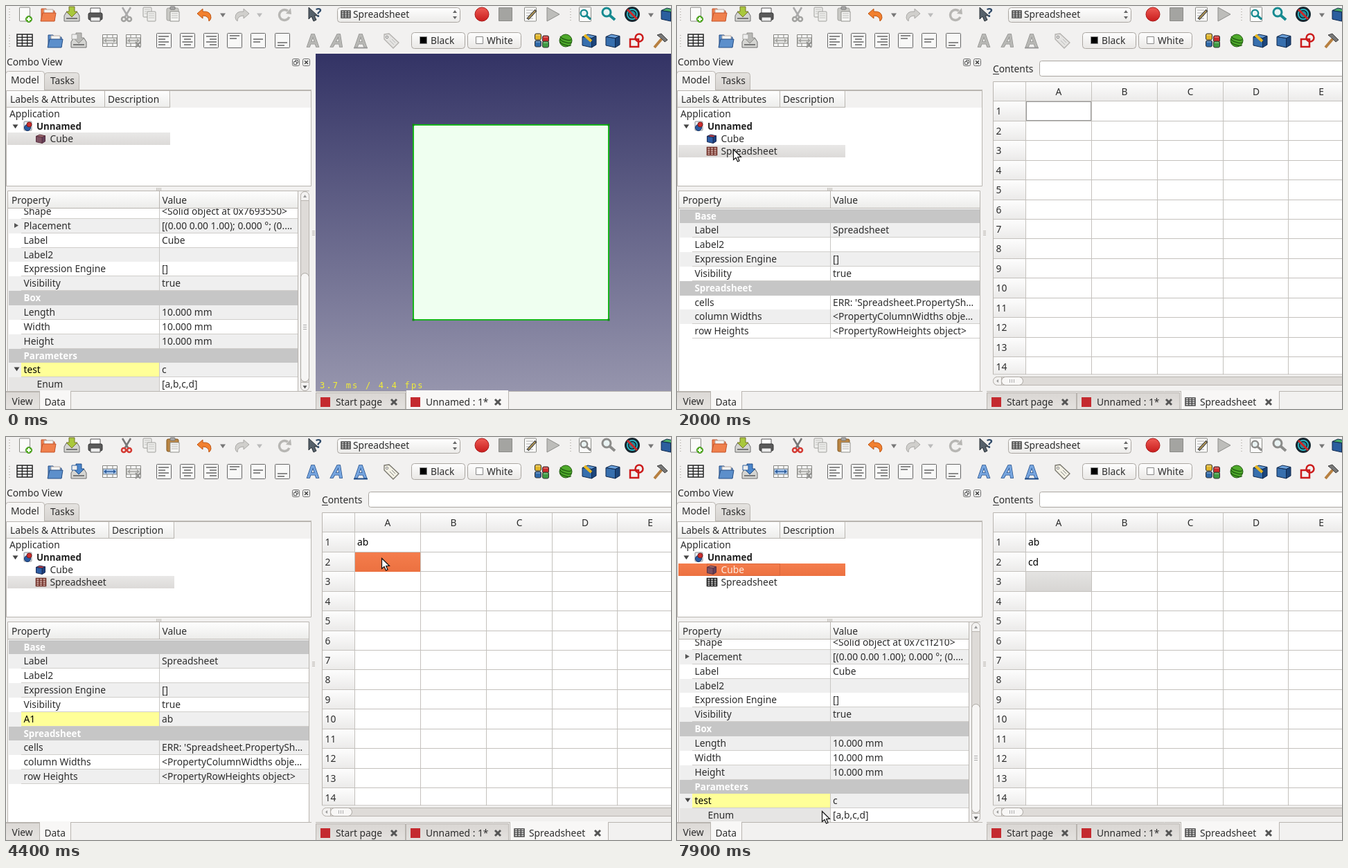
Animation of 960x583 px, one loop 8 s. Source, as an HTML page with a canvas:

```html
<!DOCTYPE html>
<html lang="en">
<head>
<meta charset="utf-8">
<title>Spreadsheet demo</title>
<style>
html, body { margin: 0; width: 100%; height: 100%; overflow: hidden; background: #f2f1f0; }
canvas { display: block; }
</style>
</head>
<body>
<canvas id="stage" width="960" height="583"></canvas>
<script>
const c = document.getElementById('stage').getContext('2d');
const LOOP = 8000, STEP = 100;
const UI = '13.8px "Noto Sans", "Open Sans", sans-serif';
const BOLD = 'bold 13.3px "Noto Sans", "Open Sans", sans-serif';
const INK = '#2c2c2c', LINE = '#b9b5b0', BG = '#f2f1f0', ORANGE = '#f07746';

// --- drawing helpers ---
function paint(fill, stroke, w = 1) {
  if (fill) { c.fillStyle = fill; c.fill(); }
  if (stroke) { c.strokeStyle = stroke; c.lineWidth = w; c.stroke(); }
}
function rect(x, y, w, h, fill, stroke, r = 0, lw = 1) {
  c.beginPath(); c.roundRect(x, y, w, h, r); paint(fill, stroke, lw);
}
function circle(x, y, r, fill, stroke, w) {
  c.beginPath(); c.arc(x, y, r, 0, 7); paint(fill, stroke, w);
}
function poly(p, fill, stroke, w, open) {
  c.beginPath();
  for (let i = 0; i < p.length; i += 2) c.lineTo(p[i], p[i + 1]);
  if (!open) c.closePath();
  paint(fill, stroke, w);
}
const line = (x1, y1, x2, y2, col = LINE, w = 1) => poly([x1, y1, x2, y2], null, col, w, true);
function text(s, x, y, col = INK, font = UI, align = 'left') {
  c.font = font; c.fillStyle = col; c.textAlign = align;
  c.fillText(s, x, y);
}
function fade(y0, y1, a, b) {
  const g = c.createLinearGradient(0, y0, 0, y1);
  g.addColorStop(0, a); g.addColorStop(1, b);
  return g;
}
function at(x, y, draw) { c.save(); c.translate(x, y); draw(); c.restore(); }
const down = (x, y, r, col) => poly([x - r, y - r * .6, x + r, y - r * .6, x, y + r * .8], col);

// --- icons, centred on 0,0 ---
function grid(x, y, w, h, rows, col, bg = '#fff') {
  rect(x, y, w, h, bg, col, 0, 1.5);
  for (let i = 1; i < rows; i++) line(x, y + h * i / rows, x + w, y + h * i / rows, col, 1.4);
  for (let i = 1; i < 3; i++) line(x + w * i / 3, y, x + w * i / 3, y + h, col, 1.4);
}
function box(s, face, side, top, edge = '#10294e') {
  poly([-s, -s * .55, s * .35, -s * .35, s * .35, s, -s, s * .7], face, edge);
  poly([s * .35, -s * .35, s, -s * .65, s, s * .6, s * .35, s], side, edge);
  poly([-s, -s * .55, -s * .2, -s * .9, s, -s * .65, s * .35, -s * .35], top, edge);
}
function page(w = 15, h = 20) { rect(-w / 2, -h / 2, w, h, '#fbfbfa', '#8b8b87', 1); }
function folder(col, edge) {
  poly([-10, 9, -10, -8, -3, -8, -1, -5, 9, -5, 9, 9], col, edge);
  rect(-6, -7, 13, 7, '#f4f4f2', '#b5aaa4');
  poly([-11, 10, -8, -2, 11, -2, 9, 10], col, edge);
}
function drive(arrow, body, edge) {
  poly([-11, 2, -8, -3, 8, -3, 11, 2, 11, 10, -11, 10], body, '#6c6c6c');
  line(-8, 6, 8, 6, '#777', 2);
  poly([-4, -11, 4, -11, 4, -4, 8, -4, 0, 4, -8, -4, -4, -4], arrow, edge);
}
function lens(col) {
  line(2, 2, 10, 9, col, 4);
  circle(-2, -2, 6, '#e9f3f3', col, 3);
}
function bend(col, edge) {
  c.beginPath();
  c.moveTo(-11, -2); c.lineTo(-3, -9); c.lineTo(-3, -5);
  c.quadraticCurveTo(9, -6, 9, 4); c.quadraticCurveTo(8, 8, 6, 9);
  c.quadraticCurveTo(6, 1, -3, 1); c.lineTo(-3, 5); c.closePath();
  paint(col, edge);
}
function align(x, kind) {
  rect(x - 10.5, 39.5, 21, 21, '#f8f8f7', '#666', 1);
  for (let i = 0; i < 4; i++) {
    const w = i % 2 ? 10 : 15, sx = [x - 8, x - w / 2, x + 8 - w][kind];
    if (kind < 3) line(sx, 44 + i * 4, sx + w, 44 + i * 4, '#666', 1.5);
  }
  if (kind > 2) [0, 4].forEach(d => line(x - 7, 43 + (kind - 3) * 5 + d, x + 7 - d, 43 + (kind - 3) * 5 + d, '#666', 1.5));
}
function merge(x, on, split) {
  const col = on ? '#2f5f9e' : '#a3a3a0';
  rect(x - 10.5, 41.5, 21, 17, '#fafafa', '#868682');
  [-4, 4].forEach(d => { line(x + d, 42, x + d, 46, '#868682'); line(x + d, 54, x + d, 58, '#868682'); });
  rect(x - 10, 46, 20, 8, on ? '#a9c6ea' : '#e6e6e4', '#868682');
  line(x - 8, 50, x + 8, 50, col, 1.5);
  poly([x - 9, 50, x - 5, 47, x - 5, 53], col);
  poly([x + 9, 50, x + 5, 47, x + 5, 53], col);
  if (split) { line(x + 3, 52, x + 10, 60, '#929290', 2); line(x + 10, 52, x + 3, 60, '#929290', 2); }
}
function letter(x, on, style) {
  c.font = style + 'bold 25px "Liberation Sans", sans-serif';
  c.textAlign = 'center';
  c.lineWidth = 1.4; c.strokeStyle = on ? '#1d4a87' : '#8d8d8b';
  c.strokeText('A', x, 59);
  c.fillStyle = on ? '#76a5df' : '#b8b8b5';
  c.fillText('A', x, 59);
}
function handle(x, y) {
  for (let i = -2; i < 3; i++) rect(x, y + i * 4, 2, 1, '#c4c0bb');
}

// --- toolbars ---
function topBar(s) {
  handle(4, 12);
  at(27, 12, () => { page(); circle(6, 7, 4.5, '#5fb92d', '#3c8a16'); line(3, 7, 9, 7, '#fff', 2); line(6, 4, 6, 10, '#fff', 2); });
  at(61, 12, () => folder('#f0804c', '#c4532a'));
  at(95, 12, () => drive('#a9c83c', '#d3d3d0', '#75752c'));
  at(129, 12, () => {
    rect(-7, -9, 14, 9, '#fff', '#555');
    rect(-10, -2, 20, 10, '#5b5b5b', '#333', 2);
    rect(-7, 4, 14, 6, '#eee', '#444');
  });
  at(174, 12, () => {
    const col = s.tools ? '#d43a33' : '#a2a2a0', blade = s.tools ? '#777' : '#aaa';
    line(-6, -10, 3, 5, blade, 2.5); line(6, -10, -3, 5, blade, 2.5);
    circle(-4, 7, 3, null, col, 2.5); circle(4, 7, 3, null, col, 2.5);
  });
  at(207, 12, () => [[-9, -10], [-3, -4]].forEach(([x, y]) => {
    rect(x, y, 12, 14, '#eeeeec', '#a0a09c', 1);
    for (let i = 3; i < 12; i += 3) line(x + 2, y + i, x + 10, y + i, '#c2c2bf');
  }));
  at(241, 12, () => {
    rect(-9, -9, 17, 18, s.tools ? '#b98543' : '#c9c9c5', s.tools ? '#80561f' : '#a0a09c', 2);
    rect(-4, -11, 7, 4, '#aaa', '#777', 1);
    rect(-4, -4, 13, 14, '#f6f6f4', '#90908c');
    for (let i = -1; i < 8; i += 3) line(-2, i, 7, i, '#b7b7b4');
  });
  at(287, 13, () => bend('#f2802f', '#bd5616'));
  down(313, 13, 4, '#777');
  at(340, 13, () => { c.scale(-1, 1); bend('#d0cfcc', '#aaa9a6'); });
  down(366, 13, 4, '#bbb');
  c.beginPath(); c.arc(402, 13, 7.5, .4, 5.4); paint(null, '#b7b6b3', 3.5);
  poly([404, 11, 411, 3, 412, 12], '#b7b6b3');
  poly([437, 2, 437, 19, 441, 15, 444, 22, 448, 20, 445, 14, 450, 14], '#56616b', '#2a3036');
  text('?', 447, 16, '#2f4a68', 'bold 18px "Noto Sans", sans-serif');

  rect(478.5, 2.5, 177, 21, fade(2, 24, '#fff', '#ebeae8'), '#aaa6a1', 4);
  grid(484, 7, 13, 10, 4, '#444');
  text('Spreadsheet', 501, 17);
  poly([645, 10, 651, 10, 648, 6], '#666'); poly([645, 15, 651, 15, 648, 19], '#666');

  circle(687, 12, 10, fade(2, 22, '#ee5a53', '#c91d1d'), '#a91818');
  rect(711.5, 2.5, 19, 19, '#a4a4a1', '#8b8b88');
  at(757, 12, () => {
    page(17, 20);
    for (let i = -6; i < 8; i += 4) line(-6, i, 4, i, '#aaa');
    line(-4, 7, 8, -6, '#444', 4); line(-3, 6, 7, -5, '#c9a95a', 1.5);
  });
  poly([781, 2, 799, 12, 781, 22], '#bdbdba', '#8f8f8c');
  handle(814, 12);
  const zoom = s.tools ? '#8c8c8a' : '#168a90';
  at(836, 12, () => { page(17, 21); c.scale(.8, .8); lens(zoom); });
  at(869, 11, () => lens(zoom));
  circle(904, 12, 9.5, '#2ec0ce', '#17262f', 3);
  circle(904, 12, 5.5, '#1d8f9f', '#17262f', 1.5);
  line(897, 5, 911, 19, '#cf2828', 3);
  down(931, 13, 4, '#777');
  at(956, 12, () => box(10, '#2b5e9e', '#1b3d72', '#4caf6a'));
}

function sheetBar(s) {
  handle(4, 50);
  if (s.hover) rect(11.5, 34.5, 31, 31, fade(34, 66, '#fff', '#e9e7e4'), '#b9b5b0', 4);
  grid(16, 41, 22, 17, 4, '#222');
  at(71, 50, () => folder('#5c8fcb', '#274f86'));
  at(105, 50, () => {
    drive(s.tools ? '#4a86cc' : '#b9b9b6', '#d5d5d2', s.tools ? '#234f87' : '#8f8f8c');
    rect(-10, -9, 8, 7, '#eee', s.tools ? '#2d5e9c' : '#a8a8a5');
  });
  merge(150, s.tools); merge(184, false, true);
  [228, 262, 296, 330, 364, 399].forEach(align);
  letter(443, s.tools, ''); letter(478, s.tools, 'italic '); letter(512, s.tools, '');
  line(502, 60.5, 522, 60.5, s.tools ? '#1d4a87' : '#999', 2);
  poly([546, 41, 553, 40, 567, 53, 559, 61, 546, 48], s.tag ? '#f2f0e4' : '#e4e3e1', s.tag ? '#77756c' : '#b3b1ae', 1.3);
  circle(550, 45, 1.7, BG, '#888');
  line(554, 50, 560, 56, s.tag ? '#888' : '#bbb'); line(557, 48, 562, 53, s.tag ? '#888' : '#bbb');
  [[585, 'Black', '#000'], [666, 'White', '#fff']].forEach(([x, name, col]) => {
    rect(x + .5, 38.5, 77, 23, fade(38, 62, '#fefefe', '#e9e7e5'), '#aaa6a1', 4);
    rect(x + 12.5, 44.5, 10, 10, col, '#888');
    text(name, x + 28, 55);
  });
  at(774, 50, () => {
    [['#e0b52b', -6, -6], ['#cc2b2b', 5, -3], ['#2e68a8', -6, 4], ['#3f9b43', 5, 5]].forEach(([col, x, y]) => {
      rect(x - 4.5, y - 4, 9, 9, col, '#333', 2);
      line(x - 3, y - 2, x + 3, y - 2, '#fff8');
    });
  });
  circle(808, 50, 9, '#4faa2b', '#20590e');
  for (let i = -1; i < 2; i++) {
    c.beginPath(); c.ellipse(808, 50 + i * 4, 8, 2.5, .3, 0, 3.1); paint(null, '#1f5b10', 1.3);
  }
  at(842, 50, () => { box(10, '#376fae', '#1c467c', '#5d94cf'); line(-7, -8, 3, 1, '#e9b822', 4); });
  at(876, 50, () => box(10, '#376fae', '#1c467c', '#6aa0da'));
  rect(901, 48, 12, 11, null, '#cc1b1b', 0, 2.5);
  circle(914, 46, 5.5, null, '#cc1b1b', 2.5);
  line(936, 60, 947, 47, '#b78041', 4);
  poly([940, 42, 946, 40, 955, 49, 951, 52, 945, 46], '#777', '#444');
}

// --- left dock ---
function cubeIcon(x, y, sel) {
  at(x, y, () => sel ? box(6.5, '#7c5061', '#63405a', '#a26b6c', '#5a3041') : box(6.5, '#2d5da5', '#1d3f80', '#c8383c', '#1c2c55'));
}
function dock(s) {
  text('Combo View', 1, 86);
  [418, 433].forEach((x, i) => {
    rect(x - 4.5, 76.5, 10, 10, '#f8f8f7', '#666', 2);
    if (i) { line(x - 2, 79, x + 3, 84, '#444', 1.6); line(x + 3, 79, x - 2, 84, '#444', 1.6); }
    else { rect(x - .5, 78.5, 4, 4, null, '#555'); rect(x - 2.5, 80.5, 4, 4, '#fff', '#555'); }
  });
  rect(55.5, 96.5, 50, 26, fade(96, 122, '#e5e3e0', '#d6d3d0'), LINE, [4, 4, 0, 0]);
  line(0, 121.5, 441, 121.5);
  rect(-.5, 94.5, 56, 28, '#f6f5f4', LINE, [4, 4, 0, 0]);
  rect(0, 121, 55, 3, '#f6f5f4');
  text('Model', 7, 112); text('Tasks', 64, 113);

  const split = s.made ? 148 : 142, end = split + 95;
  rect(.5, 122.5, 440, 138, '#fff', LINE);
  rect(1, 123, 439, 24, BG);
  rect(1, 123, end, 24, fade(123, 147, '#fefefe', '#ececea'));
  line(1, 146.5, end, 146.5); line(split + .5, 123, split + .5, 147); line(end - .5, 123, end - .5, 147);
  text('Labels & Attributes', 6, 140); text('Description', split + 5, 140);
  text('Application', 5, 161);
  down(13.5, 174, 4, '#444');
  rect(26, 167, 11, 13, '#e9edf2', '#8a8f96', 1);
  circle(31, 176, 4.5, '#2a5aa0', '#173666'); circle(33.5, 171.5, 3.5, '#cc2f2f', '#7c1717');
  text('Unnamed', 44, 179, '#222', BOLD);

  const selY = s.sheetSel ? 201 : 183;
  rect(2, selY, end - 2, 18, s.hot ? fade(selY, selY + 18, '#f47d4d', '#ec7140') : fade(selY, selY + 18, '#e9e8e7', '#dcdad8'));
  if (s.hot) rect(43.5, selY + .5, split - 43, 17, null, '#d9663a');
  const tone = sel => sel && s.hot ? '#fdeadd' : INK;
  cubeIcon(50, 192, !s.sheetSel);
  text('Cube', 63.5, 197, tone(!s.sheetSel));
  if (s.made) {
    grid(43.5, 204.5, 14, 11, 4, s.sheetSel ? '#6b2820' : '#111', s.sheetSel ? '#f3dcd4' : '#fff');
    text('Spreadsheet', 63.5, 215, tone(s.sheetSel));
  }
  for (let i = 0; i < 4; i++) {
    rect(217 + i * 2, 263, 1, 4, '#c0bcb7');
    rect(442, 325 + i * 2, 4, 1, '#c0bcb7');
  }
  props(s);
  line(0, 557.5, 441, 557.5);
  rect(-.5, 558.5, 49, 30, fade(558, 583, '#dcd9d6', '#e5e3e0'), LINE);
  rect(48.5, 557.5, 45, 30, '#f8f7f6', LINE);
  rect(49, 556, 44, 4, '#f8f7f6');
  text('View', 8.5, 577); text('Data', 55.5, 578);
}

function rowsFor(s) {
  const shared = [['Expression Engine', '[]'], ['Visibility', 'true']];
  if (s.sheetSel) return [
    ['Base'], ['Label', 'Spreadsheet'], ['Label2', ''], ...shared,
    ...(s.a1 ? [['A1', 'ab', 'y']] : []), ...(s.a2 ? [['A2', 'cd', 'y']] : []),
    ['Spreadsheet'], ['cells', "ERR: 'Spreadsheet.PropertySh…"],
    ['column Widths', '<PropertyColumnWidths obje…'], ['row Heights', '<PropertyRowHeights object>']];
  const size = '10.000 mm';
  return [
    ['Shape', `<Solid object at 0x${s.hash}>`], ['Placement', '[(0.00 0.00 1.00); 0.000 °; (0.…', 'r'],
    ['Label', 'Cube'], ['Label2', ''], ...shared,
    ['Box'], ['Length', size], ['Width', size], ['Height', size],
    ['Parameters'], ['test', 'c', 'yd'], ['Enum', '[a,b,c,d]', 'c']];
}

function props(s) {
  const right = s.sheetSel ? 437 : 421, H = 20.85, top = s.sheetSel ? 293.5 : 287;
  rect(2.5, 267.5, 435, 290, '#fff', LINE);
  c.save();
  c.beginPath(); c.rect(3, 292, right - 3, 265); c.clip();
  rowsFor(s).forEach(([name, value, kind = ''], i) => {
    const y = Math.round(top + i * H), base = y + 15;
    if (value === undefined) {
      rect(4, y, right, 21, '#c6c6c6');
      return text(name, 25.5, base, '#fff', BOLD);
    }
    rect(4, y, right, 21, i % 2 ? '#efefef' : '#fff');
    if (kind === 'c') rect(4, y, 217, 21, '#e6e5e4');
    if (kind[0] === 'y') rect(22, y, 199, 21, '#ffff98');
    line(22, y + 20.5, right, y + 20.5, '#d0cecb');
    line(221.5, y, 221.5, y + 21, '#c8c6c3');
    if (kind === 'r') poly([12, y + 6, 12, y + 13, 18, y + 9.5], '#555');
    if (kind === 'yd') down(15.5, y + 9, 4, '#444');
    text(name, kind === 'c' ? 44.5 : 25.5, base, kind[0] === 'y' ? '#000' : INK);
    text(value, 225, base);
  });
  c.restore();
  rect(3, 268, right - 3, 24, fade(268, 292, '#fefefe', '#ececea'));
  line(3, 292.5, right, 292.5); line(221.5, 268, 221.5, 292);
  text('Property', 8, 286); text('Value', 225.5, 286);
  if (s.sheetSel) return;
  rect(422, 268, 17, 289, BG);
  line(421.5, 268, 421.5, 557);
  rect(425.5, 268.5, 12, 288, '#dedbd8', LINE, 6);
  rect(425.5, 268.5, 12, 13, '#f3f2f1', LINE, [6, 6, 0, 0]);
  rect(425.5, 544.5, 12, 12, '#f3f2f1', LINE, [0, 0, 6, 6]);
  rect(425.5, 386.5, 12, 157, '#f6f5f4', '#aaa6a1', 6);
  poly([429, 277, 434, 277, 431.5, 273], '#999'); down(431.5, 551, 3, '#555');
  for (let i = 0; i < 3; i++) line(429, 461.5 + i * 3, 434, 461.5 + i * 3, '#aaa');
}

// --- right side ---
function view3d(s) {
  rect(447, 69, 513, 488, fade(69, 557, '#333365', '#9695ad'));
  const on = !s.sheetSel, edge = on ? '#18b41c' : '#111';
  rect(588, 172, 282, 282, on ? '#effff0' : '#cccccc', edge, 0, 2);
  [588, 870].forEach(x => [172, 454].forEach(y => rect(x - 1.5, y - 1.5, 3, 3, on ? '#0f8a14' : '#000')));
  c.letterSpacing = '2.2px';
  text(s.made ? '4.4 ms / 0.9 fps' : '3.7 ms / 4.4 fps', s.made ? 452 : 453, 553, '#f3ee35', '12px "DejaVu Sans Mono", monospace');
  c.letterSpacing = '0px';
}

function sheet(s) {
  text('Contents', 456, 96);
  line(456, 98.5, 465, 98.5, INK);
  rect(523.5, 79.5, 450, 22, '#fff', '#aaa6a1', 3);
  const col = i => 504 + Math.round(i * 94.85), row = i => Math.round(138.4 + i * 28.43);
  rect(456, 110, 504, 423, '#fff');
  c.save();
  c.beginPath(); c.rect(456, 109, 504, 424.5); c.clip();
  rect(456, 110, 504, 28, fade(110, 138, '#fdfdfd', '#ebeae9'));
  for (let i = 0; i < 14; i++) {
    rect(456, row(i), 47, 28, fade(row(i), row(i) + 28, '#fdfdfd', '#ebeae9'));
    text(i + 1, 460.5, row(i) + 19);
    line(456, row(i) - .5, 960, row(i) - .5, '#c4c1bd');
  }
  for (let i = 0; i < 5; i++) {
    line(col(i) - .5, 110, col(i) - .5, 533, '#c4c1bd');
    text('ABCDE'[i], col(i) + 47, 129, INK, UI, 'center');
  }
  rect(456.5, 109.5, 520, 423.5, null, LINE);
  if (s.cell >= 0 && !s.edit) {
    const y = row(s.cell);
    rect(504, y, 94, 28, s.cellHot ? fade(y, y + 28, '#f47d4d', '#ec7140') : fade(y, y + 28, '#e4e3e2', '#d7d5d3'));
  }
  if (s.cell < 0) {
    c.setLineDash([1, 1]); rect(504.5, 138.5, 93, 27, null, '#333'); c.setLineDash([]);
  }
  s.words.forEach((w, i) => {
    const live = s.edit && i === s.cell, x = live ? 509 : 507;
    if (live) rect(504.5, row(i) + .5, 93, 27, '#fff', ORANGE);
    text(w, x, row(i) + 19, '#000');
    if (live) rect(Math.round(x + c.measureText(w).width), row(i) + 6, 1, 16, '#111');
  });
  c.restore();
  rect(456.5, 536.5, 520, 12, '#dedbd8', LINE, 6);
  rect(456.5, 536.5, 12, 12, '#f3f2f1', LINE, [6, 0, 0, 6]);
  rect(468.5, 536.5, 31, 12, '#f8f7f6', '#aaa6a1', 6);
  poly([464, 540, 464, 545, 461, 542.5], '#999');
  for (let i = 0; i < 3; i++) line(480.5 + i * 3, 540, 480.5 + i * 3, 545, '#aaa');
}

function tabs(s) {
  const list = [[447, 577, 'Start page', 476, 560], [577, 726, 'Unnamed : 1*', 606, 710]];
  if (s.open) list.push([727, 870, 'Spreadsheet', 755, 854]);
  line(447, 557.5, 960, 557.5);
  list.forEach(([x, end, name, tx, cx], i) => {
    const live = i === list.length - 1;
    rect(x + .5, live ? 557.5 : 559.5, end - x - 1, 30, live ? '#f8f7f6' : fade(559, 583, '#d9d6d3', '#e4e2df'), LINE);
    if (live) rect(x + 1, 556, end - x - 2, 4, '#f8f7f6');
    if (i < 2) rect(x + 7, 566, 14, 14, '#c42a2f');
    else grid(734, 567, 14, 11, 4, '#444');
    text(name, tx, 578);
    [1, -1].forEach(d => line(cx - 4, 573 - 4 * d, cx + 4, 573 + 4 * d, '#555', 3));
  });
}

// --- motion ---
const PATH = [
  [200, -2, 330], [800, 24, 49], [1000, 24, 49], [1500, 81, 207], [2100, 81, 207], [2400, 540, 161],
  [3500, 540, 161], [3600, 594, 165], [3800, 542, 175], [4700, 542, 175], [4800, 540, 208],
  [5100, 540, 208], [5900, 74, 196], [6200, 71, 190], [6400, 71, 190], [7200, 42, 549],
  [7300, 42, 549], [7900, 209, 541]];
function pointer(t) {
  if (t < 200 || (t >= 3200 && t < 3600) || (t >= 4500 && t < 4800)) return;
  let i = 1;
  while (i < PATH.length - 1 && t > PATH[i][0]) i++;
  const [t0, x0, y0] = PATH[i - 1], [t1, x1, y1] = PATH[i];
  const u = Math.min(1, (t - t0) / (t1 - t0)), e = u * u * (3 - 2 * u);
  at(Math.round(x0 + (x1 - x0) * e) + .5, Math.round(y0 + (y1 - y0) * e) + .5, () =>
    poly([0, 0, 0, 15, 3.5, 12, 6, 17.5, 8.5, 16.5, 6.2, 11, 11, 11], '#fff', '#111', 1.2));
}
const typed = (word, t, first, second) => word.slice(0, (t >= first) + (t >= second));

function state(t) {
  const sheetSel = t >= 1700 && t < 6100;
  return {
    sheetSel, made: t >= 1000, open: t >= 2000, tools: t >= 2400, tag: t >= 4000,
    a1: t >= 4000, a2: t >= 5100, hover: t >= 800 && t < 1200,
    hot: (t >= 1000 && t < 2000) || t >= 6100,
    hash: t < 1000 ? '7693550' : t < 1700 ? '53eccf0' : t < 6600 ? '57c8b30' : '7c1f210',
    cell: t < 2400 ? -1 : t < 3800 ? 0 : t < 4800 ? 1 : 2,
    cellHot: t < 6100,
    edit: (t >= 3200 && t < 3800) || (t >= 4500 && t < 4800),
    words: [typed('ab', t, 3400, 3600), typed('cd', t, 4600, 4700)]
  };
}

function frame(now) {
  const t = Math.floor((now % LOOP) / STEP) * STEP, s = state(t);
  rect(0, 0, 960, 583, BG);
  topBar(s); sheetBar(s); dock(s);
  if (s.open) sheet(s); else view3d(s);
  tabs(s);
  pointer(t);
  requestAnimationFrame(frame);
}
requestAnimationFrame(frame);
</script>
</body>
</html>
```
